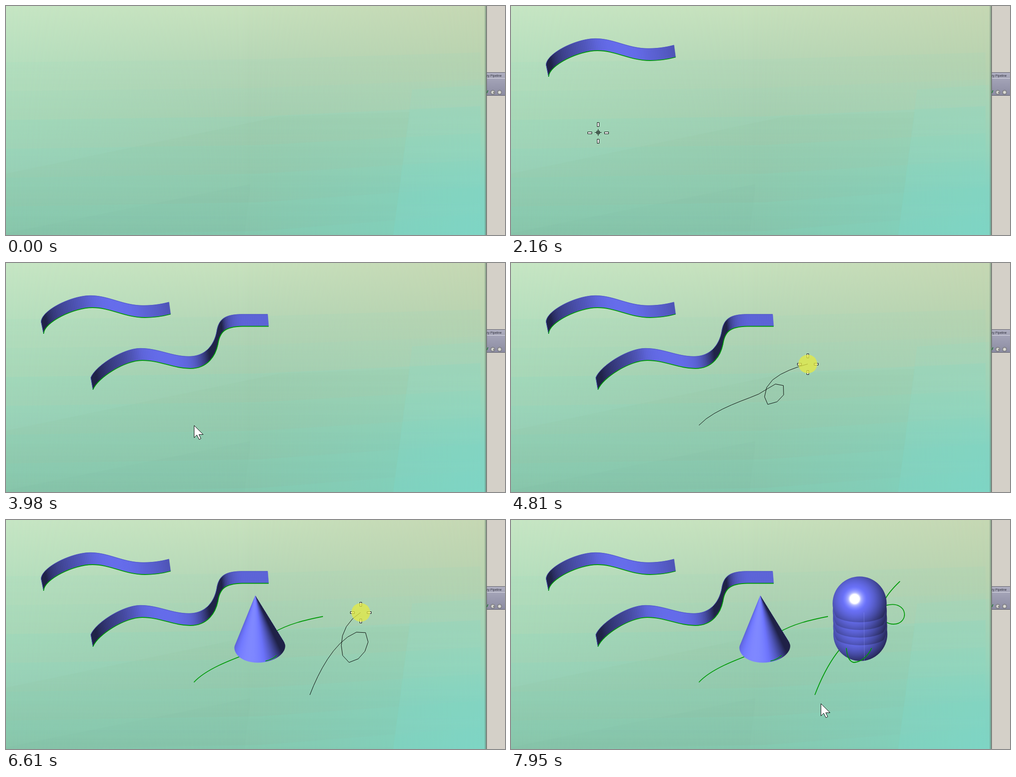
Animation of 1102x508 px, one loop 8 s. Source, as an HTML page with a canvas:

```html
<!DOCTYPE html>
<html lang="en">
<head>
<meta charset="utf-8">
<title>Sketching extruded curves</title>
<style>
html, body { margin: 0; width: 100%; height: 100%; overflow: hidden; background: #d4d0c8; }
#stage { position: absolute; left: 0; top: 0; width: 1102px; height: 508px; overflow: hidden; }
#stage > * { position: absolute; }
.view { left: 0; top: 0; width: 1060px; height: 508px; }
.left { background: linear-gradient(#c6e6c4, #b6dfbe 25%, #a8d8b8 50%, #9cd2b7 68%, #88c7ad); }
.middle { background: linear-gradient(#c7e1bd, #b6d6b6 25%, #a4ceb0 50%, #94caaf 75%, #87c6ae);
  mask-image: linear-gradient(90deg, transparent, #000 50%); }
.right { background: linear-gradient(#c5d7b3, #b8d2af 25%, #a9d2b4 45%, #9cd3b8 60%, #86d2bf 80%, #80d3c3);
  mask-image: linear-gradient(90deg, transparent 50%, #000); }
.edge { left: 1056px; top: 0; width: 6px; height: 508px;
  background: linear-gradient(90deg, #5a7a6a00, #5a7a6a99 4px, #8c948c 4px 5px, #5c605c 5px); }
.panel { left: 1062px; top: 147px; width: 40px; height: 50px; border: solid #5c5c66; border-width: 1px 0;
  background: linear-gradient(#b0b0c2, #a4a4b6 12px, #dcdce6 12px 13px, #a3a3b7 13px, #8c8ca2);
  font: 7px/13px "Liberation Sans", Arial, sans-serif; color: #30303c; white-space: nowrap; overflow: hidden; }
</style>
</head>
<body>
<div id="stage">
  <div class="view left"></div><div class="view middle"></div><div class="view right"></div>
  <div class="edge"></div>
  <div class="panel">ry Pipeline</div>
  <canvas width="1102" height="508" style="left:0;top:0"></canvas>
</div>
<script>
const ctx = document.querySelector('canvas').getContext('2d');
const GREEN = '#009a08';

// Each hand-drawn stroke becomes a green curve with a solid on it
const strokes = [
  { d: 'M83 157C84 131 150 99 191 99S262 121 307 121Q336 121 363.5 113.5',
    start: 1132, end: 1582, done: 1640, solid: ribbon },
  { d: 'M192 281C202 255 262 216 301 216S370 234 407 234C446 234 463 205 468 180C472 154 482 141 522 140.5H580',
    start: 2210, end: 2730, done: 2860, solid: ribbon },
  { d: 'M415 360C442 330 500 309 540 294C560 286 580 266 596 265C612 278 606 312 563 314C555 290 562 268 590 250C625 230 660 222 700 214',
    start: 4240, end: 4885, done: 5060, solid: cone },
  { d: 'M671 388C695 325 735 255 787 245C816 258 792 314 757 316C738 312 738 270 744 254C756 212 805 189 830 189C878 178 880 231 845 231C815 231 818 200 825 178Q834 160 859 136',
    start: 5880, end: 7185, done: 7430, solid: capsule }
];

// Places the cursor glides through between strokes: time, x, y
const stops = [[430, 404, 371], [760, 4, 151], [940, 4, 151], [1710, 407, 151], [1960, 226, 297], [2160, 192, 281],
  [3130, 466, 324], [3390, 430, 363], [3720, 415, 360], [4990, 744, 240], [5640, 671, 388], [7500, 890, 278], [7950, 684, 407]];

for (const s of strokes) {
  const path = document.createElementNS('http://www.w3.org/2000/svg', 'path');
  path.setAttribute('d', s.d);
  const length = path.getTotalLength();
  s.at = p => {
    const { x, y } = path.getPointAtLength(p * length);
    return [x, y];
  };
  s.trace = (p, spacing) => {
    const count = Math.max(1, Math.round(p * length / spacing));
    return Array.from({ length: count + 1 }, (_, i) => s.at(p * i / count));
  };
  s.curve = s.trace(1, 4);
  stops.push([s.start, ...s.at(0)], [s.end, ...s.at(1)]);
}
stops.sort((a, b) => a[0] - b[0]);

function glide(t) {
  const i = stops.findLastIndex(s => t >= s[0]);
  const a = stops[i], b = stops[i + 1] || a;
  const f = (t - a[0]) / (b[0] - a[0] || 1), e = f * f * (3 - 2 * f);
  return [a[1] + (b[1] - a[1]) * e, a[2] + (b[2] - a[2]) * e];
}

const blue = light => `rgb(${102 * light},${109 * light},${238 * light})`;

function shade(gradient, light, scale = 1) {
  for (let i = 0; i <= 16; i++) gradient.addColorStop(i / 16 * scale, blue(light(i / 16)));
  return gradient;
}

function fill(path, style) {
  ctx.fillStyle = style;
  ctx.fill(new Path2D(path));
}

function line(path, color = GREEN, width = 1.8) {
  ctx.strokeStyle = color;
  ctx.lineWidth = width;
  ctx.stroke(new Path2D(path));
}

function disc(x, y, r, style) {
  ctx.fillStyle = style;
  ctx.beginPath();
  ctx.arc(x, y, r, 0, 7);
  ctx.fill();
}

function clipped(region, paint) {
  ctx.save();
  ctx.clip(new Path2D(region));
  paint();
  ctx.restore();
}

function glow(x, y, r, inner, middle, outer) {
  const g = ctx.createRadialGradient(x, y, 0, x, y, r);
  [inner, middle, outer].forEach((color, i) => g.addColorStop([.38, .55, 1][i], color));
  disc(x, y, r, g);
}

function backdrop() {
  for (let i = -2; i < 5; i++) {
    const l = 253 + 64 * i, m = 245 + 63.5 * i, r = 222 + 59.5 * i;
    const g = ctx.createLinearGradient(0, l - 10, 0, l + 60);
    g.addColorStop(0, i < 0 ? '#7cdcc814' : '#7cdcc82c');
    g.addColorStop(1, '#7cdcc800');
    fill(`M0 ${l}L560 ${m}L1048 ${r}V${r + 59}L560 ${m + 63}L0 ${l + 64}Z`, g);
  }
  fill('M0 372L605 245L892 235L855 508H0Z', '#80a88010');
  fill('M0 504L540 395L527 508H0Z', '#70a8900e');
  fill('M897 185L1056 175V508H855Z', '#78dcd014');
}

function panelIcons() {
  line('M1062 193L1064.5 187', '#1c7a30', 1.5);
  for (const x of [1075, 1090]) glow(x, 191.5, 5.2, '#deded8', '#c0c0bc', '#66666c');
  disc(1077, 192, 1.5, '#707074');
}

// A strip swept upwards from the curve, lit by the slope of each piece
function ribbon({ curve, d }) {
  const top = curve.map(([x, y]) => [x - 6 + x / 150, y - 26.6]);
  for (let i = 1; i < curve.length; i++) {
    const [ax, ay] = curve[i - 1], [bx, by] = curve[i];
    const color = blue(Math.max(.3, Math.cos(Math.atan2(ay - by, bx - ax) + .44)));
    const piece = `M${curve[i - 1]}L${curve[i]}L${top[i]}L${top[i - 1]}Z`;
    fill(piece, color);
    line(piece, color, .7);
  }
  line(`M${curve[0]}L${top.join('L')}`, '#4c54c4', 1);
  line(d);
}

function cone({ d }) {
  const right = 1.02, sweep = .94;
  line(d);
  fill('M550.5 167L505 279C501 292 515 316 556 316.5C596 316 619 294 616.5 277L614 270Z',
    shade(ctx.createConicGradient(right, 550.5, 167),
      u => Math.max(.3, 1.25 * Math.cos((u - .68) * 2.4)), sweep / (2 * Math.PI)));
  clipped('M573 300h32v20h-32z', () => line(d));
}

function sphere(x, y) {
  disc(x, y, 59.7, shade(ctx.createRadialGradient(x - 11, y - 10, 0, x - 10, y - 10, 75),
    r => 1.15 * Math.cos(r * 1.27)));
}

function capsule({ d }) {
  line(d);
  // Each higher sphere overlaps the one below along a curved seam
  for (let i = 0; i < 5; i++) {
    const x = 771.5 - .4 * i, y = 253 - 17 * i, seam = i ? y + 19 : 400;
    clipped(`M700 100H840V${seam}H${x + 59}A59 23 0 0 1 ${x - 59} ${seam}H700Z`, () => sphere(x, y));
  }
  glow(759, 175, 27, '#fff', '#c4c8ffb0', '#8088ff00');
  line('M779.5 205L780.5 312', '#9aa0ff66', 1);
  clipped('M738 284h64v36h-64z', () => line(d));
}

function crosshair(x, y, pressed) {
  ctx.fillStyle = '#fff';
  ctx.strokeStyle = '#000';
  ctx.lineWidth = 1;
  for (const side of [-22.5, 14.5])
    for (const box of [[x - 1.5, y + side, 4, 9], [x + side, y - 1.5, 9, 4]]) {
      ctx.fillRect(...box);
      ctx.strokeRect(...box);
    }
  if (pressed) return disc(x + .5, y, 20.7, 'rgba(228,234,66,.75)');
  ctx.strokeRect(x - 2.5, y - 3.5, 6, 6);
  line(`M${x - 7} ${y - .5}h15M${x + .5} ${y - 8}v15`, '#000', 1);
}

function arrow(x, y) {
  const shape = `M${x + .5} ${y + .5}v27l6 -6l5 10l4 -2l-4.5 -9h9.5z`;
  fill(shape, '#fff');
  line(shape, '#000', 1);
}

function draw(now) {
  const t = now % 8000;
  ctx.clearRect(0, 0, 1102, 508);
  backdrop();
  panelIcons();
  for (const s of strokes) {
    if (t >= s.done) s.solid(s);
    else if (t >= s.start) {
      const progress = Math.min(1, (t - s.start) / (s.end - s.start)) ** .83;
      line('M' + s.trace(progress, 22).join('L'), '#000', 1);
    }
  }
  if (t >= 430) {
    const active = strokes.find(s => t >= s.start - 240 && t < s.end);
    const pressed = active && t >= active.start;
    const place = pressed ? active.at(((t - active.start) / (active.end - active.start)) ** .83) : glide(t);
    const [x, y] = place.map(Math.round);
    if (active) crosshair(x, y, pressed);
    else arrow(x, y);
  }
  requestAnimationFrame(draw);
}
requestAnimationFrame(draw);
</script>
</body>
</html>
```
